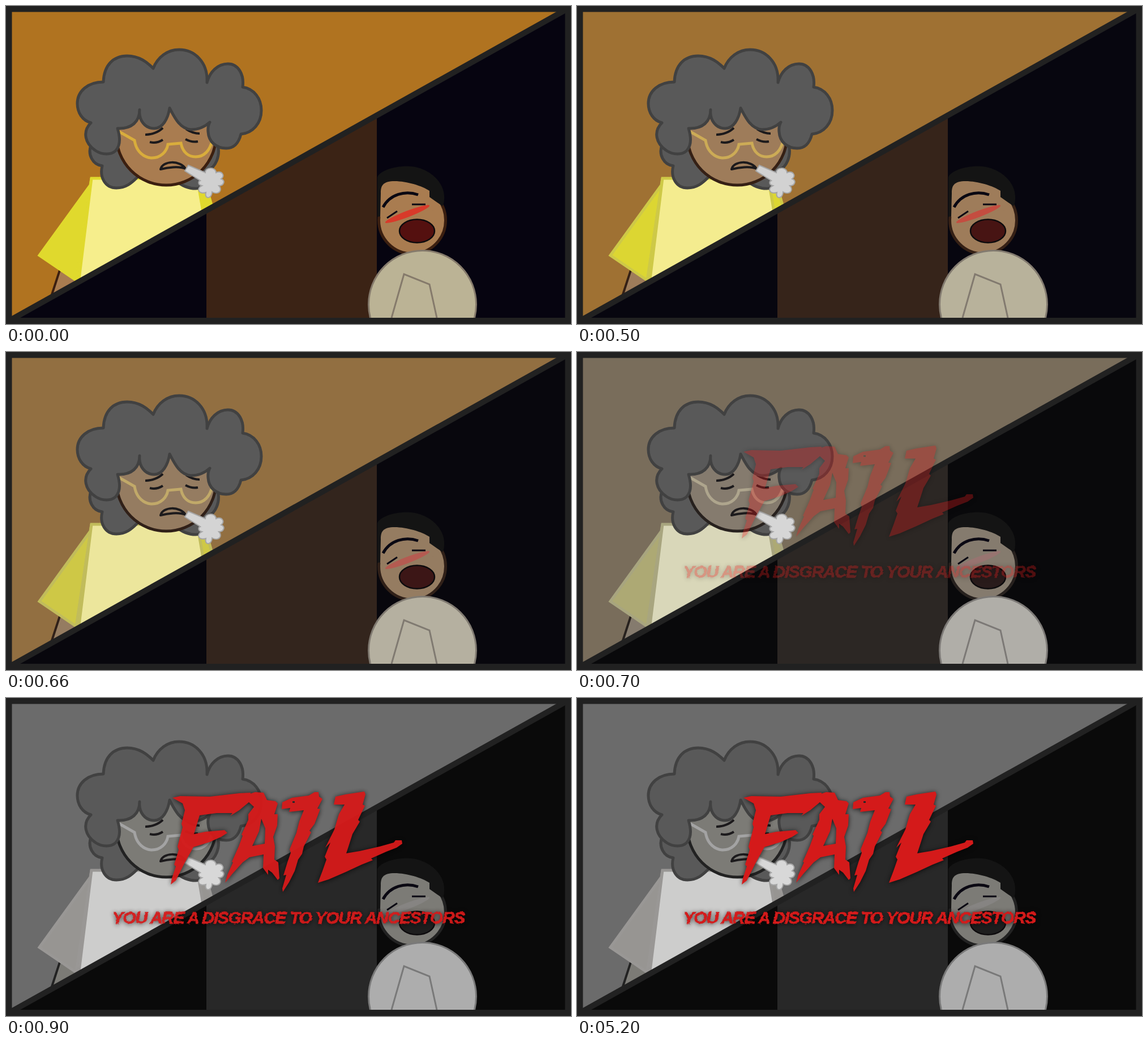
These frames come from a looping animation (998x561 px, 8 s). An HTML page:

```html
<!DOCTYPE html>
<html lang="en">
<head>
<meta charset="utf-8">
<title>Fail</title>
<style>
html, body { margin: 0; height: 100%; overflow: hidden; background: #212121; }
svg { display: block; width: 100vw; height: 100vh; }
.line { fill: none; stroke: #1c1a1c; stroke-width: 4; }
.hair { fill: #595959; stroke: #414141; stroke-width: 5; stroke-linejoin: round; }
.skin { fill: var(--skin); stroke: var(--edge); stroke-width: 5; }
.sleeve { fill: var(--sleeve); stroke: var(--trim); stroke-width: 5; }
.shirt { fill: var(--shirt); stroke: var(--trim); stroke-width: 5; }
.robe { fill: var(--robe); stroke: var(--fold); stroke-width: 3; }
#title { fill: #d41a1a; filter: drop-shadow(0 1px 4px rgba(0, 0, 0, .75)); }
#title text {
  font: italic bold 30px "Liberation Sans", Arial, sans-serif;
  letter-spacing: -1.3px; text-anchor: middle; stroke: #d41a1a; stroke-width: .8;
}
</style>
</head>
<body>
<svg viewBox="0 0 998 561" preserveAspectRatio="none">
  <defs>
    <clipPath id="upper"><path d="M10 10H982L10 552Z"/></clipPath>
    <clipPath id="inner"><path d="M10 10H988V550H10Z"/></clipPath>
    <filter id="rough" x="-2%" y="-20%" width="104%" height="140%">
      <feTurbulence type="turbulence" baseFrequency=".12 .2" numOctaves="2" seed="4" result="n"/>
      <feDisplacementMap in="SourceGraphic" in2="n" scale="3" xChannelSelector="R" yChannelSelector="G"/>
    </filter>
  </defs>

  <g clip-path="url(#inner)">
    <path fill="var(--dark)" d="M0 0H998V561H0Z"/>
    <path fill="var(--door)" d="M354 190H655V561H354Z"/>

    <!-- yawning man -->
    <circle class="skin" cx="717.5" cy="378" r="59"/>
    <path fill="var(--skin)" d="M661 372V305L700 300L760 325V360Z"/>
    <path fill="#141414" d="M656 372V302C660 290 690 281 714 283C746 285 776 310 774 340Q774 348 771 353L748 337V326C735 317 705 308 683 309C665 310 662 318 662 330L661 371Z"/>
    <ellipse fill="var(--blush)" cx="709" cy="367" rx="42" ry="5.5" transform="rotate(-21 709 367)"/>
    <path fill="none" stroke="#0a0812" stroke-width="5" d="M666 355C678 332 705 325 728 333"/>
    <path fill="none" stroke="#0a0812" stroke-width="3" d="M673 374L691 362M717 350H741"/>
    <ellipse fill="var(--mouth)" stroke="#0d0b0d" stroke-width="2.5" cx="726" cy="397" rx="31" ry="20.5"/>
    <circle class="robe" cx="735.5" cy="526.5" r="95"/>
    <path class="robe" d="M681 550L703 473L748 491L761 550"/>

    <!-- sighing grandmother -->
    <g clip-path="url(#upper)">
      <path fill="var(--wall)" d="M0 0H998V561H0Z"/>
      <path fill="var(--skin)" d="M95 468L124 485L120 495L81 512Z"/>
      <path fill="none" stroke="var(--edge)" stroke-width="4" d="M95 466L80 512"/>
      <path class="sleeve" d="M149 316L59 440L124 484L151 304Z"/>
      <path class="sleeve" d="M338 304L352 312L366 362L345 372Z"/>
      <path class="shirt" d="M151 304H338L350 375L128 490Z"/>
      <path class="hair" d="M150 246C144 262 153 280 170 282C165 302 175 321 195 321C212 321 222 312 231 303L300 200Z"/>
      <path class="hair" d="M300 200L374 245C379 265 370 285 356 290C358 310 350 322 335 322C320 322 308 315 300 308Z"/>
      <circle class="skin" cx="283" cy="228" r="88"/>
      <path class="line" d="M246 227C258 227 270 222 277 215M318 217Q330 225 342 225M254 240Q266 243 277 236M317 235Q328 241 339 239"/>
      <path fill="none" stroke="var(--glasses)" stroke-width="5" d="M197 220L227 237C230 258 245 268 258 268C273 268 284 257 286 244L309 242C312 258 322 266 335 266C350 266 360 255 364 238"/>
      <path class="line" stroke-linejoin="round" d="M273 288C277 272 308 272 317 287C305 282 285 285 273 288Z"/>
      <path class="hair" d="M172 134C173 104 190 88 214 88C236 88 250 100 260 110C268 90 285 77 306 77C332 77 357 98 355 135C360 116 374 102 392 102C411 102 421 122 418 143C438 146 451 163 451 184C451 207 436 224 415 226C411 242 402 251 389 251C372 251 358 240 357 222Q356 212 360 205C350 214 340 218 327 218C306 217 296 193 289 180C286 200 276 216 262 216C246 216 234 202 236 183C236 204 222 217 197 216C202 232 202 246 194 255C186 263 170 263 158 255C140 243 134 222 150 206C135 202 126 188 126 172C126 150 145 134 172 134Z"/>
      <path fill="var(--puff)" stroke="#a6a6a6" stroke-width="2" d="M322 281L352 294C351 284 371 283 371 294C381 290 388 299 380 305C388 308 385 317 376 317C384 326 374 334 364 328C364 340 350 342 353 329C341 333 335 322 346 317C338 315 340 309 343 308L316 291Z"/>
    </g>
    <path stroke="#212121" stroke-width="10" d="M0 558.3L998 1.5"/>
  </g>
  <path fill="#212121" fill-rule="evenodd" d="M0 0H998V561H0ZM10.5 10.5V550H987.5V10.5Z"/>

  <g id="title">
    <path d="M294 176L308 173L360 174L412 168L432 167L430 183L412 198L396 208L400 203L372 203L342 207L332 240L352 236L386 233L391 238L380 245L360 254L331 263L315 292L300 322L291 329L293 318L300 297L297 294L305 268L303 262L312 228L310 222L316 198L312 186Z"/>
    <path fill-rule="evenodd" d="M428 170L440 166L455 167L461 180L476 182L480 186L474 205L480 205L479 225L472 245L475 262L474 285L481 290L483 318L480 321L470 308L463 303L463 312L454 300L455 276L430 281L418 290L400 310L387 326L391 312L401 290L399 289L411 262L418 243L416 241L428 215L428 205L438 192L428 183ZM451 213L447 235L435 261L457 257L458 230Z"/>
    <path fill-rule="evenodd" d="M488 184L505 176L535 172L545 166L552 166L553 174L559 178L550 195L555 196L545 222L536 234L539 237L526 262L523 275L516 285L510 305L500 325L489 342L488 336L495 312L490 313L497 290L503 273L501 267L513 238L518 218L526 198L500 201L502 194L487 196ZM506 182H510V185H506Z"/>
    <path d="M582 174L600 170L633 165L635 170L630 188L634 190L622 215L625 218L612 240L605 262L601 274L625 270L660 262L685 255L688 251L699 251L700 257L690 264L672 271L645 283L648 286L628 294L600 307L570 320L551 326L559 305L566 285L563 280L573 255L564 264L580 232L588 205L598 188L579 188Z"/>
    <text x="498" y="397" filter="url(#rough)">YOU ARE A DISGRACE TO YOUR ANCESTORS</text>
  </g>
</svg>
<script>
// Each colour drains from its first value to its second.
const colours = {
  wall: [[176, 115, 32], [107, 107, 107]],
  dark: [[6, 4, 16], [10, 10, 10]],
  door: [[59, 35, 21], [40, 40, 40]],
  skin: [[169, 124, 80], [124, 123, 118]],
  edge: [[59, 31, 16], [34, 34, 34]],
  shirt: [[246, 238, 140], [205, 205, 204]],
  trim: [[224, 217, 45], [153, 151, 149]],
  sleeve: [[224, 217, 45], [151, 149, 146]],
  glasses: [[217, 173, 60], [163, 163, 163]],
  puff: [[208, 208, 208], [216, 216, 216]],
  blush: [[216, 58, 42], [134, 132, 130]],
  mouth: [[84, 16, 15], [30, 30, 30]],
  robe: [[187, 179, 149], [173, 173, 173]],
  fold: [[133, 122, 107], [121, 121, 121]]
};
const late = ["sleeve", "shirt"];
// Progress per 100 ms step, beginning with the resting state.
const drain = [0, .25, .44, .79, 1, 1, 1];
const lateDrain = [0, .05, .25, .7, 1, 1, 1];
const reveal = [0, 0, 0, .35, .66, .96, 1];
const root = document.documentElement;
const title = document.getElementById("title");

function draw(now) {
  const step = Math.min(6, Math.max(0, Math.floor(now % 8000 / 100) - 4));
  for (const [name, [from, to]] of Object.entries(colours)) {
    const p = (late.includes(name) ? lateDrain : drain)[step];
    const rgb = from.map((c, i) => Math.round(c + (to[i] - c) * p));
    root.style.setProperty("--" + name, `rgb(${rgb})`);
  }
  title.style.opacity = reveal[step];
}

const start = performance.now();
function tick() {
  draw(performance.now() - start);
  requestAnimationFrame(tick);
}
tick();
</script>
</body>
</html>
```
